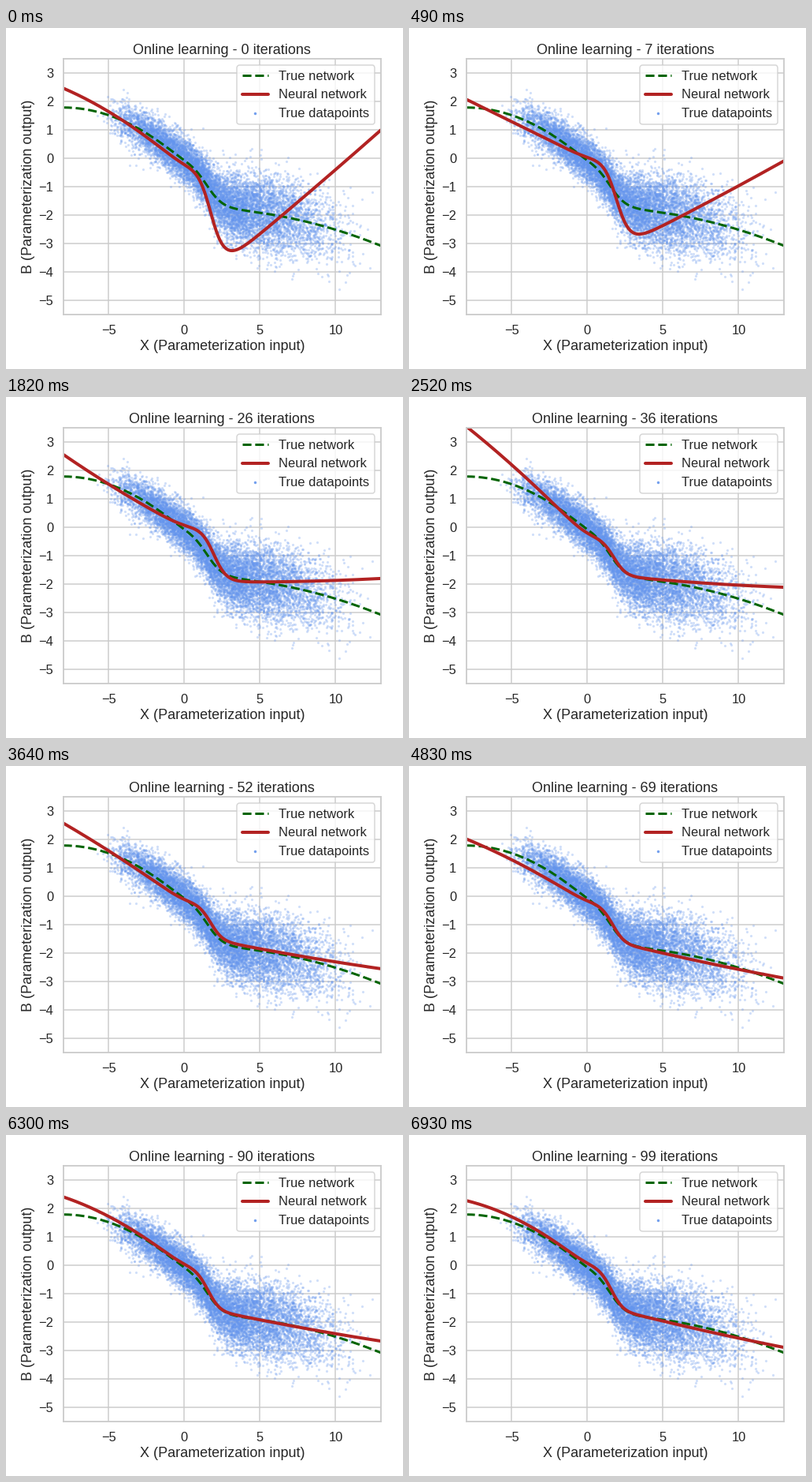
Write a matplotlib script that moves like this. It is 504 by 432 pixels and loops after 7000 ms.

```python
import matplotlib.pyplot as plt
import numpy as np
from matplotlib.animation import FuncAnimation

W, H, DPI = 504, 432, 72
FRAMES, STEP_MS = 100, 70

plt.rcParams.update({
    "font.family": "Liberation Sans",
    "font.size": 18,
    "axes.titlesize": 18, "axes.labelsize": 18,
    "xtick.labelsize": 16.5, "ytick.labelsize": 16.5,
    "legend.fontsize": 16.5,
    "text.color": "0.15", "axes.labelcolor": "0.15",
    "xtick.color": "0.15", "ytick.color": "0.15",
    "axes.edgecolor": "0.8", "axes.linewidth": 1.875,
    "grid.color": "0.8", "grid.linewidth": 1.5,
    "patch.linewidth": 1.5,
    "axes.axisbelow": True,
})


def ramp(z):
    """Soft rectifier."""
    return np.logaddexp(0, 2 * z) / 2


def step_up(x, center, width):
    return 1 / (1 + np.exp(-(x - center) / width))


def network(x, level, left, bend, drop, right, center, width=0.42, right_bend=0.0015):
    """Two curved arms joined by a soft step."""
    n, v = ramp(-x), ramp(x - 3)
    return (level + left * n + bend * n**2 + drop * step_up(x, center, width)
            + right * v + right_bend * v**2)


def true_network(x):
    return network(x, -0.13, 0.48, -0.03, -1.67, -0.041, 1.5, 0.55, -0.0087)


# Training milestones: iteration -> level, left, bend, drop, right, center
MILESTONES = {
    0: (-0.33, 0.47, -0.015, -3.22, 0.44, 1.75),
    16: (0.36, 0, 0.019, -2.45, 0.045, 2.17),
    36: (-0.37, 0.555, -0.008, -1.39, -0.05, 1.75),
    52: (-0.22, 0.39, -0.005, -1.42, -0.106, 1.74),
    69: (-0.25, 0.348, -0.008, -1.5, -0.128, 1.68),
    80: (-0.1, 0.428, -0.012, -1.6, -0.087, 1.53),
    99: (-0.04, 0.45, -0.02, -1.66, -0.134, 1.59),
}


def weights_at(iteration):
    times = list(MILESTONES)
    return [np.interp(iteration, times, w) for w in zip(*MILESTONES.values())]


def sample_points(n=10000):
    rng = np.random.default_rng(4)
    x = -5.2 + 17.8 * rng.beta(2.4, 3.4, n) + rng.normal(0, 0.4, n)
    spread = 0.37 + 0.32 * step_up(x, 2.5, 1)
    return x, true_network(x) + spread * rng.standard_normal(n)


fig = plt.figure(figsize=(W / DPI, H / DPI), dpi=DPI, facecolor="white")
left, right, top, bottom = 72.6, 476.1, 39.2, 363
ax = fig.add_axes([left / W, 1 - bottom / H, (right - left) / W, (bottom - top) / H])
ax.set(xlim=(-8, 13), ylim=(-5.5, 3.5), xticks=range(-5, 11, 5), yticks=range(-5, 4))
ax.set_xlabel("X (Parameterization input)", labelpad=5)
ax.set_ylabel("B (Parameterization output)")
ax.tick_params(length=9, bottom=False, left=False)
ax.grid(True)

grid_x = np.linspace(-8, 13, 300)
blue = dict(color="cornflowerblue", linewidths=0)
ax.scatter(*sample_points(), s=10, alpha=0.3, zorder=1, **blue)
true_line, = ax.plot(grid_x, true_network(grid_x), "--", color="darkgreen", lw=3,
                     label="True network")
fit_line, = ax.plot([], [], color="firebrick", lw=4, label="Neural network",
                    solid_capstyle="round")
dot = ax.scatter([], [], s=12, alpha=0.9, label="True datapoints", **blue)
ax.legend(handles=[true_line, fit_line, dot], loc="upper right")
title = ax.set_title("")


def draw(iteration):
    fit_line.set_data(grid_x, network(grid_x, *weights_at(iteration)))
    title.set_text(f"Online learning - {iteration} iterations")
    return fit_line, title


anim = FuncAnimation(fig, draw, frames=FRAMES, interval=STEP_MS, repeat=True,
                     repeat_delay=0, blit=False)
plt.show()
```
